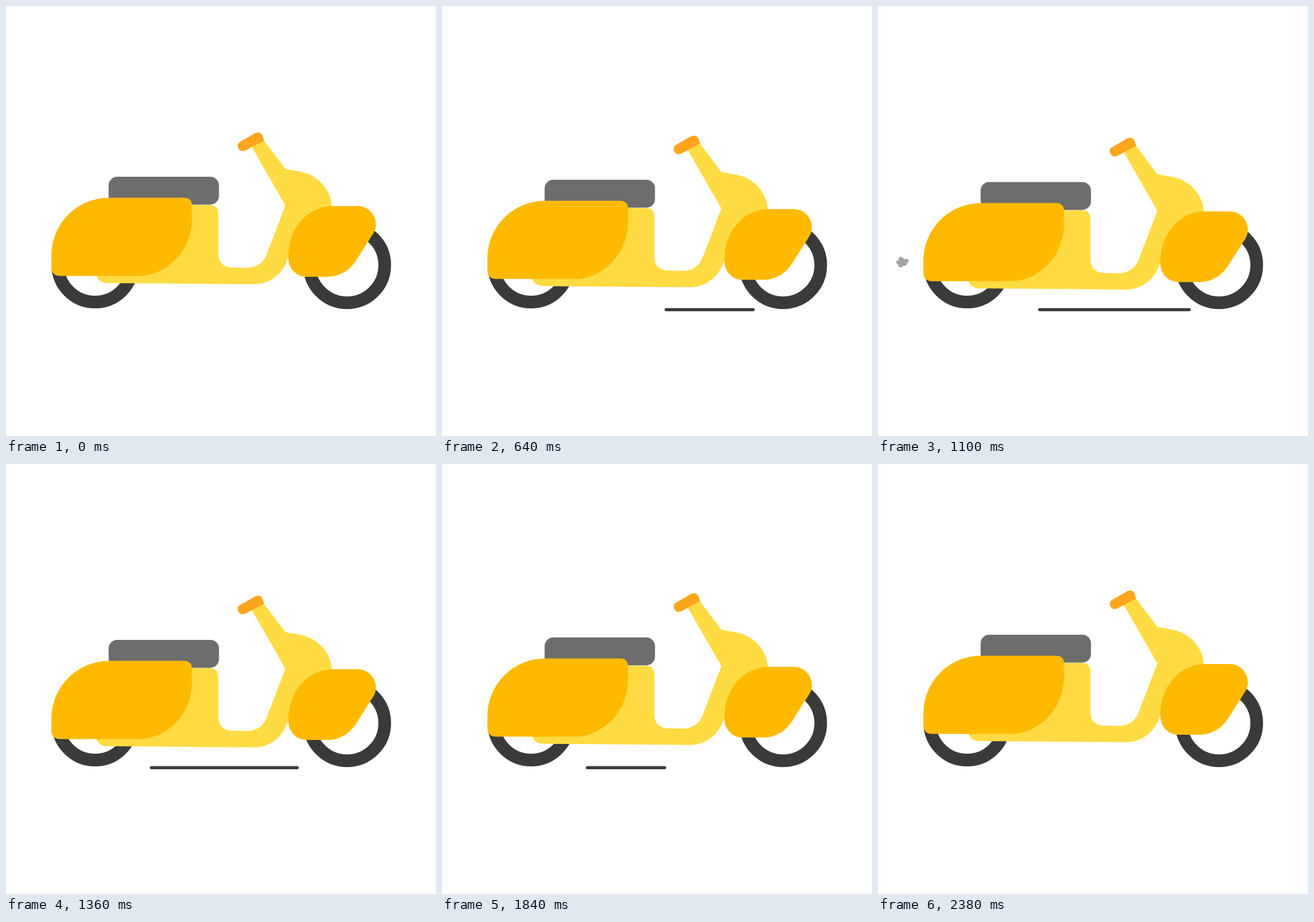
An HTML page that plays this animation: 748 px wide and 748 px high, repeating every 2420 ms.

```html
<!DOCTYPE html>
<html lang="en">
<head>
<meta charset="utf-8">
<title>Scooter</title>
<style>
  html, body { margin: 0; width: 100%; height: 100%; overflow: hidden; background: #fff; }
  svg { display: block; width: 100%; height: 100%; }
</style>
</head>
<body>
<svg viewBox="0 0 748 748">
  <g fill="none" stroke="#3a3a3a" stroke-width="22">
    <circle cx="155" cy="450" r="65"/>
    <circle cx="593.3" cy="450.7" r="65.5"/>
  </g>
  <line id="road" y1="528.3" y2="528.3" stroke="#3a3a3a" stroke-width="5.5" stroke-linecap="round"/>
  <g id="puff" fill="#a6a3a3">
    <circle r="7"/>
    <circle cx="-8.6" cy="0.6" r="3.4"/>
    <circle cx="-2.8" cy="-5" r="5"/>
    <circle cx="-3.4" cy="5.6" r="5"/>
    <circle cx="3.8" cy="2.4" r="5.2"/>
    <circle cx="7.8" cy="-2" r="4.2"/>
  </g>
  <g id="frame">
    <path fill="#ffdb43" d="M427 244 L448 233 L486 283.5 L511 288 C541 293 566 318 567 350 L491 437
      C483 464 461 484 431 484 L178 482 C164 482 157 476 156 462 L250 346 H354 Q369 346 369.5 361
      V431 C369.5 446 379 455 393 455 L421 455.5 C436 455 448 446 453 433 L486 347 Z"/>
    <rect x="178.5" y="297" width="192" height="48.5" rx="15" fill="#6d6d6d"/>
    <path fill="#ffba00" d="M79 434 C79 378 124 333.5 180 333.5 H309 Q323.5 333.5 323.5 347 V371
      C323.5 425 281 469.5 230 469.5 H94 Q79 469.5 79 454 Z"/>
    <path fill="#ffba00" d="M569 348 H612 C630 348 643.5 363 643.5 380 C643.5 386 642 391 638 397
      L612 438 C600 459 581 471 560 471 H523 C504 471 491 456 491 437 C491 385 526 348 569 348 Z"/>
    <path fill="#ffa51c" d="M406 237 L434 221 Q442 218 446 225 L449 234 L416 251.5
      Q407 255 403.5 246 Q402 240 406 237 Z"/>
  </g>
</svg>
<script>
  const LOOP = 2420, END = 2380, TURN = 1220, STEP = 20;
  const PUFF = 580, PUFF_START = 5, PUFFS = 3;
  const [road, puff, frame] = ["road", "puff", "frame"].map(id => document.getElementById(id));
  const clamp = v => Math.max(0, Math.min(1, v));
  const show = (el, on) => el.setAttribute("visibility", on ? "visible" : "hidden");

  function draw(time) {
    const t = Math.min(END, Math.floor(time % LOOP / STEP) * STEP);
    const down = clamp(t / TURN);
    const up = clamp((t - TURN) / (END - TURN));

    frame.setAttribute("transform", `translate(0 ${10.2 * (down - up)})`);

    // the road line grows to the left, then shrinks from the right
    road.setAttribute("x1", 541.25 - 288.25 * down);
    road.setAttribute("x2", 541.25 - 288.25 * up);
    show(road, down > up);

    // three puffs drift out from behind the body
    const n = (t - PUFF_START) / PUFF;
    const on = n > 0 && n < PUFFS;
    show(puff, on);
    if (on) {
      const p = n % 1;
      puff.setAttribute("transform", `translate(${109.9 - 76 * p} 445.3) scale(${p})`);
    }
  }

  const start = performance.now();
  function tick() {
    draw(performance.now() - start);
    requestAnimationFrame(tick);
  }
  tick();
</script>
</body>
</html>
```
